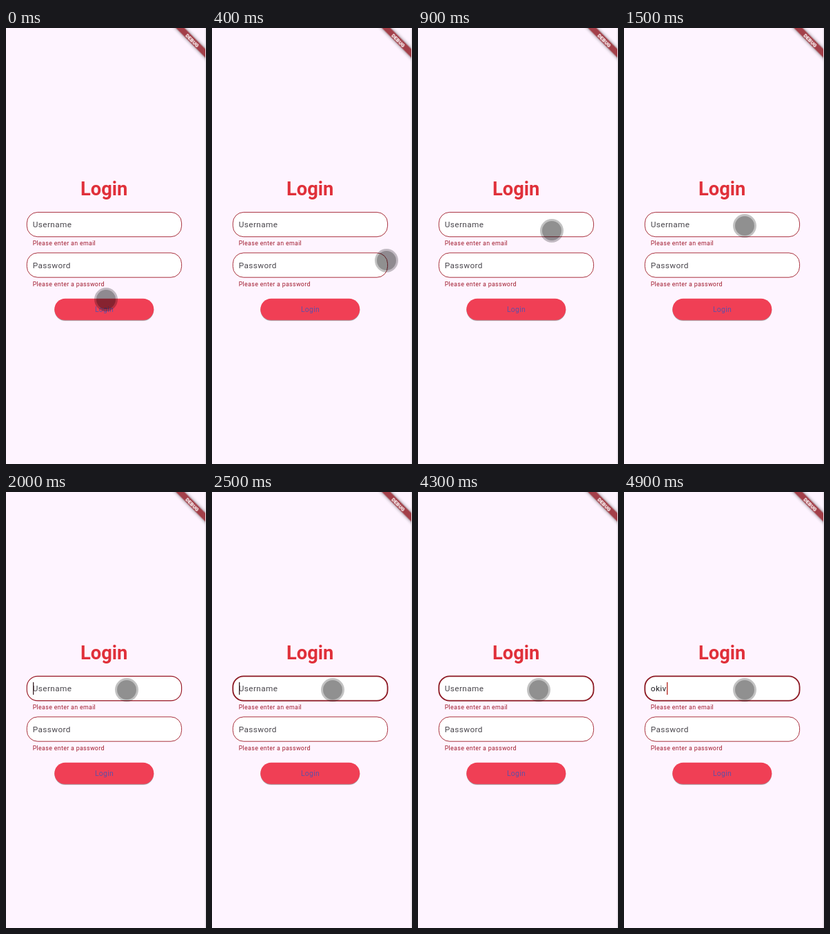
An HTML page that plays this animation: 290x628 px, repeating every 5000 ms.

```html
<!DOCTYPE html>
<html lang="en">
<head>
<meta charset="utf-8">
<title>Login form</title>
<style>
  html, body { margin: 0; width: 100%; height: 100%; overflow: hidden; background: #fef4ff; }
  svg { display: block; width: 290px; height: 628px; font-family: Roboto, sans-serif; }

  .title { font-size: 27.3px; font-weight: 700; fill: #e0303a; text-anchor: middle; }
  .label, .typed { font-size: 11.8px; letter-spacing: .37px; }
  .label { fill: #49464c; }
  .typed { fill: #1d1b20; }
  .error { font-size: 8.86px; letter-spacing: .33px; fill: #a11d2f; }
  .action { font-size: 10.4px; letter-spacing: .3px; fill: #5f50a6; text-anchor: middle; }
  .field { fill: #fff; stroke: #a01c2a; stroke-width: .9px; }
  .button { fill: #f03f55; filter: drop-shadow(0 1px .7px rgba(0, 0, 0, .35)); }
  .ribbon-text { font-size: 7.5px; font-weight: 900; fill: #fff; text-anchor: middle; }

  .focus { animation: focus 5s step-end infinite; }
  .hint { animation: hint 5s step-end infinite; }
  .typed { animation: typed 5s step-end infinite; }
  .caret { animation: caret 5s step-end infinite; }
  .touch { animation: touch 5s step-end infinite; }

  @keyframes focus {
    0% { stroke: #a01c2a; stroke-width: .9px; }
    38% { stroke: #9c1b28; stroke-width: 1px; animation-timing-function: steps(5, end); }
    48%, 100% { stroke: #8c1822; stroke-width: 1.8px; }
  }
  @keyframes hint { 0% { opacity: 1; } 92%, 100% { opacity: 0; } }
  @keyframes typed { 0% { opacity: 0; } 92%, 100% { opacity: 1; } }
  @keyframes caret {
    0% { opacity: 0; transform: translate(0, 0); fill: #3c2428; }
    36% { opacity: 1; transform: translate(0, 0); fill: #3c2428; }
    70% { opacity: 0; transform: translate(0, 0); fill: #3c2428; }
    92%, 100% { opacity: 1; transform: translate(23px, 0); fill: #b3261e; }
  }
  @keyframes touch {
    0% { transform: translate(145px, 391px); }
    2% { transform: translate(190px, 386px); }
    4% { transform: translate(240px, 367px); }
    6% { transform: translate(263px, 348px); }
    8% { transform: translate(253px, 335px); }
    10% { transform: translate(234px, 324px); }
    12% { transform: translate(216px, 313px); }
    14% { transform: translate(208px, 305px); }
    16% { transform: translate(200px, 298px); }
    18% { transform: translate(194px, 292px); }
    20% { transform: translate(187px, 289px); }
    22% { transform: translate(180px, 286px); }
    24%, 100% { transform: translate(175px, 285px); }
  }
</style>
</head>
<body>
<svg viewBox="0 0 290 628">
  <defs>
    <clipPath id="screen"><rect width="288.5" height="628"/></clipPath>
    <filter id="blur" x="-20%" y="-100%" width="140%" height="300%">
      <feGaussianBlur stdDeviation="2.4"/>
    </filter>
  </defs>
  <rect width="290" height="628" fill="#fef4ff"/>
  <rect x="288.7" width="1" height="628" fill="#d9d3da"/>

  <text class="title" x="142.2" y="241">Login</text>

  <rect class="field focus" x="30.3" y="265.4" width="224.3" height="35.3" rx="15.5"/>
  <text class="label hint" x="38.8" y="287.2">Username</text>
  <text class="typed" x="38.8" y="287.2">okiv</text>
  <rect class="caret" x="39" y="274" width="1.3" height="18"/>
  <text class="error" x="38.7" y="313.2">Please enter an email</text>

  <rect class="field" x="30.3" y="323.9" width="224.3" height="35.3" rx="15.5"/>
  <text class="label" x="38.8" y="345.7">Password</text>
  <text class="error" x="38.7" y="371.7">Please enter a password</text>

  <rect class="button" x="70.3" y="389.8" width="144" height="31" rx="15.5"/>
  <text class="action" x="142.5" y="409.3">Login</text>

  <g clip-path="url(#screen)">
    <g transform="translate(270.4 17.8) rotate(45)">
      <rect x="-40" y="-4.4" width="80" height="8.8" opacity=".5" filter="url(#blur)"/>
      <rect x="-40" y="-4.4" width="80" height="8.8" fill="#a33f49"/>
      <text class="ribbon-text" y="2.7">DEBUG</text>
    </g>
  </g>

  <g class="touch">
    <circle r="17" opacity=".24"/>
    <circle r="14" opacity=".26"/>
  </g>
</svg>
</body>
</html>
```
